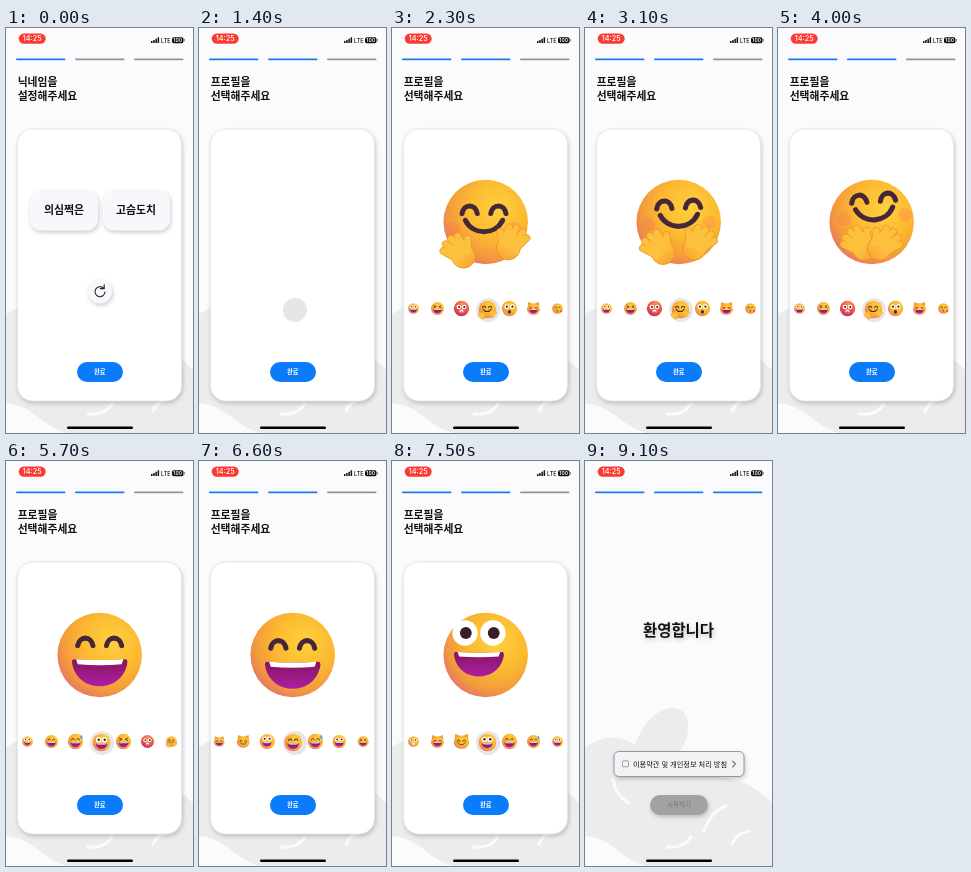
Animation of 187 by 405 pixels, one loop 9.2 s. Source, as an HTML page:

```html
<!DOCTYPE html>
<html lang="ko">
<head>
<meta charset="utf-8">
<style>
html, body { margin: 0; width: 100%; height: 100%; overflow: hidden; background: #fbfafd; }
svg { display: block; width: 100vw; height: 100vh; }
text { font-family: "Noto Sans CJK KR", "Noto Sans CJK", sans-serif; font-weight: 700; fill: #111; }
.mid { text-anchor: middle; }
.ui { font-family: Inter, sans-serif; font-weight: 600; }
.line { fill: none; stroke-linecap: round; stroke-linejoin: round; }
.soft { filter: drop-shadow(1.5px 2px 2px #0003); }
</style>
</head>
<body>
<svg viewBox="0 0 187 405">
  <defs>
    <radialGradient id="skin" cx=".64" cy=".34" r=".78">
      <stop offset="0" stop-color="#ffd040"/><stop offset=".45" stop-color="#fcb930"/>
      <stop offset=".75" stop-color="#f39a3c"/><stop offset="1" stop-color="#e2667c"/>
    </radialGradient>
    <radialGradient id="heat" cx=".6" cy=".2" r=".9">
      <stop offset="0" stop-color="#ff9350"/><stop offset=".6" stop-color="#ec4a45"/>
      <stop offset="1" stop-color="#b02a62"/>
    </radialGradient>
    <linearGradient id="mouth" x2="0" y2="1">
      <stop offset="0" stop-color="#86145f"/><stop offset="1" stop-color="#ae1fa4"/>
    </linearGradient>
    <linearGradient id="palm" x2="0" y2="1">
      <stop offset="0" stop-color="#ffd04a"/><stop offset="1" stop-color="#f9a630"/>
    </linearGradient>
    <clipPath id="inside"><rect x="12" y="101" width="163" height="272" rx="15"/></clipPath>
  </defs>

  <rect width="187" height="405" fill="#fbfafd"/>
  <g fill="#ececee">
    <path d="M0 286Q28 268 50 284Q62 252 84 247Q104 246 103 268Q102 283 92 293Q118 296 134 316Q164 318 187 342V405H60Q46 400 36 392Q18 376 0 375Z"/>
    <path class="line" stroke="#fbfafd" stroke-width="3" d="M82 386Q98 388 106 376M119 371Q124 352 141 345M147 383Q151 373 164 370M28 318Q30 334 44 342"/>
  </g>

  <rect x="12.7" y="5.4" width="27" height="10.4" rx="5.2" fill="#fb3b30"/>
  <text class="ui mid" x="26.2" y="13.2" font-size="7.3" style="fill:#fff;font-weight:500">14:25</text>
  <path d="M145 13h1.5v2h-1.5zM147.2 12h1.5v3h-1.5zM149.4 10.7h1.5v4.3h-1.5zM151.6 9.3h1.5v5.7h-1.5z" fill="#111"/>
  <text class="ui" x="155" y="14.6" font-size="5.6" style="font-weight:500">LTE</text>
  <rect x="166" y="9.2" width="11.5" height="6" rx="1.8" fill="#111"/>
  <rect x="178" y="11" width=".8" height="2.4" fill="#777"/>
  <text class="ui mid" x="171.7" y="14.1" font-size="5" style="fill:#fff">100</text>
  <g id="steps"></g>

  <g id="form">
    <g font-size="10.8"><text id="title" x="11.7" y="58.3"></text><text id="title2" x="11.7" y="72.3"></text></g>
    <rect class="soft" x="11.5" y="101" width="164" height="272" rx="15" fill="#fff" stroke="#e3e6e3" stroke-width=".8"/>
    <g id="nick">
      <g class="soft" fill="#f8f7fb">
        <rect x="24" y="162.5" width="68" height="40" rx="11"/>
        <rect x="97" y="162.5" width="67" height="40" rx="11"/>
        <circle cx="94" cy="263.5" r="12"/>
      </g>
      <g class="mid" font-size="10.9"><text x="58" y="186.3">의심쩍은</text><text x="130" y="186.3">고슴도치</text></g>
      <path class="line" stroke="#222" stroke-width="1.1" d="M97.6 260.2A5 5 0 1 0 99 264M98.2 256.8V260.6H94.4"/>
    </g>
    <g id="profile" clip-path="url(#inside)">
      <circle cx="96" cy="282" r="12" fill="#e6e6e8"/>
      <g id="faces"><g id="row"></g><g id="big" transform="translate(93.7 194) scale(.845)"></g></g>
    </g>
    <rect x="71" y="334" width="46" height="20" rx="10" fill="#0a7bfa"/>
    <text class="mid" x="93.7" y="346.2" font-size="6.3" style="fill:#fff">완료</text>
  </g>

  <g id="welcome">
    <text class="mid soft" x="93.5" y="174.5" font-size="15.4">환영합니다</text>
    <rect class="soft" x="29" y="290.5" width="130" height="25" rx="5" fill="#f3f2f5" stroke="#8e8e93" stroke-width=".9"/>
    <rect x="37.5" y="299.8" width="6" height="6" rx=".6" fill="none" stroke="#8e8e93" stroke-width=".8"/>
    <text x="48" y="305.7" font-size="7.2" style="font-weight:500">이용약관 및 개인정보 처리 방침</text>
    <path class="line" stroke="#222" stroke-width="1" d="M147.5 300l3 3-3 3"/>
    <rect class="soft" x="65" y="334" width="58" height="20" rx="10" fill="#a2a2a4"/>
    <text class="mid" x="94" y="346.4" font-size="6.5" style="fill:#747477;font-weight:500">시작하기</text>
  </g>
  <rect x="61" y="398.5" width="66" height="2.6" rx="1.3" fill="#000"/>
</svg>

<script>
const LOOP = 9200, PROFILE = 1100, LOADED = 1700, DONE = 8500;
const $ = id => document.getElementById(id);
const INK = '#45273a';

const stroke = (d, w = 6) => `<path class="line" stroke="${INK}" stroke-width="${w}" d="${d}"/>`;
const dot = (x, y, r, fill) => `<circle cx="${x}" cy="${y}" r="${r}" fill="${fill}"/>`;
const pair = (eye, gap, y) => eye(-gap, y) + eye(gap, y);
const arch = (x, y) => stroke(`M${x - 9} ${y + 5}C${x - 7} ${y - 7} ${x + 7} ${y - 7} ${x + 9} ${y + 5}`);
const round = (x, y) => dot(x, y, 15, '#fff') + dot(x + 1, y, 7, '#3a1d28');
const heart = (x, y) => `<path fill="#e8324a" d="M${x} ${y + 10}l-11-12q2-9 11-3q9-6 11 3z"/>`;
const squint = (x, y) => {
  const out = x + Math.sign(x) * 8, tip = x - Math.sign(x) * 7;
  return stroke(`M${out} ${y - 7}L${tip} ${y}L${out} ${y + 7}`);
};
const grin = `<path fill="url(#mouth)" d="M-31 5Q0 7 31 5Q34 6 32 13C28 29 14 37 0 37C-14 37-28 29-32 13Q-34 6-31 5Z"/>
  <path fill="#fff" d="M-28 5Q0 7 28 5L26 11Q0 13-26 11Z"/>`;
const smile = (y = 0) => stroke(`M-22 ${y}C-13 ${y + 18} 13 ${y + 18} 22 ${y}`);
const head = (features, x = 0, y = 0, turn = 0, skin = 'skin') =>
  `<circle r="50" fill="url(#${skin})"/><g transform="translate(${x} ${y}) rotate(${turn})">${features}</g>`;
const cat = features =>
  `<path fill="#f5a02f" d="M-44-10L-42-50L-10-38H10L42-50L44-10Z"/><ellipse cy="6" rx="50" ry="42" fill="url(#skin)"/>${features}`;

function hand(x, y, turn, side) {
  const fingers = [-11, -4, 4, 11].map(f => `M${f * .7} 4L${f * 1.1} ${-19 + Math.abs(f) * .5}`).join('');
  const shape = w => `<path class="line" stroke-width="${w}" d="${fingers}M8 8L18 -3"/>`;
  return `<g transform="translate(${x} ${y}) rotate(${turn}) scale(${side} 1)">
    <g stroke="#ee9328">${shape(9)}</g><ellipse cy="8" rx="14" ry="14" fill="url(#palm)" stroke="#ee9328"/>
    <g stroke="#fdc03c">${shape(7.4)}</g></g>`;
}

function hug(p) {
  const mix = (a, b) => a + (b - a) * p;
  const blush = dot(-36, 8, 8, '#f4605a38') + dot(36, 8, 8, '#f4605a38');
  return head(blush + pair(arch, 17, -15) + smile(-2), mix(-2, 3), mix(0, -14), mix(0, -4)) +
    hand(mix(-32, -15), mix(35, 26), mix(-46, -50), 1) + hand(mix(31, 15), mix(24, 26), mix(32, 50), -1);
}

// p is the pose of the large face; small faces rest at 0
const emoji = [
  () => head(pair(round, 16, -14) + dot(0, 20, 12, '#f9e4e4')),
  () => cat(pair(arch, 18, -6) + grin),
  () => cat(pair(arch, 18, -6) + smile(8)),
  p => head(pair(round, 16.5, -18) + `<g transform="scale(.9)">${grin}</g>`, -2 - 6 * p, -8 * p),
  p => head(pair(arch, 17, -16) + grin, 0, -3 * p),
  () => head(pair(arch, 17, -16) + grin + '<path fill="#48a5ee" d="M36-48q20 28 4 30q-16-2-4-30z"/>'),
  p => head(pair(p ? arch : round, 17, -16) + grin),
  () => head(pair(squint, 18, -14) + grin),
  () => head(pair(round, 17, -10) + dot(0, 20, 13, '#fff') + dot(0, 26, 8, '#d63a6e'), 0, 0, 0, 'heat'),
  hug,
  () => head(pair(round, 18, -12) + `<ellipse cy="22" rx="10" ry="13" fill="${INK}"/>`),
  () => cat(pair(heart, 20, -4) + grin),
  () => head(pair(arch, 17, -12) + stroke('M-4 10q12 4 2 9q11 5-2 10') + heart(32, 24))
];

$('row').innerHTML = emoji.map(draw => `<g>${draw(0)}</g>`).join('');
const small = [...$('row').children];

const ease = (t, from, to) => {
  const u = Math.min(1, Math.max(0, (t - from) / (to - from)));
  return u * u * (3 - 2 * u);
};
const wave = (t, peak, period) => Math.cos((t - peak) / period * 2 * Math.PI);
const show = (id, on) => $(id).setAttribute('display', on ? 'inline' : 'none');

function render(t) {
  const step = t < PROFILE ? 1 : t < DONE ? 2 : 3;
  $('steps').innerHTML = [10, 69, 128].map((x, i) =>
    `<rect x="${x}" y="30.4" width="49.5" height="1.8" rx=".9" fill="${i < step ? '#147de8' : '#929297'}"/>`).join('');
  show('form', step < 3);
  show('nick', step === 1);
  show('profile', step === 2);
  show('faces', t >= LOADED);
  show('welcome', step === 3);
  $('title').textContent = step === 1 ? '닉네임을' : '프로필을';
  $('title2').textContent = step === 1 ? '설정해주세요' : '선택해주세요';

  const pos = 9 - 3 * ease(t, 4400, 5400) - 3 * ease(t, 6000, 7000);
  small.forEach((g, i) => {
    const d = i - pos, a = Math.abs(d);
    const x = 93.5 + 24 * d + 2 * Math.max(0, 1 - a);
    g.setAttribute('transform', `translate(${x} ${280.5 + Math.max(0, 1 - a)}) scale(${Math.max(0, 8.8 - 1.15 * a) / 50})`);
    g.setAttribute('display', a < 3.4 ? 'inline' : 'none');
  });
  const now = Math.round(pos);
  const pose = now === 9 ? (1 + wave(t, 4000, 3400)) / 2 : wave(t, 7500, 1800);
  $('big').innerHTML = emoji[now](pose);
}

function tick() {
  render(performance.now() % LOOP);
  requestAnimationFrame(tick);
}
tick();
</script>
</body>
</html>
```
